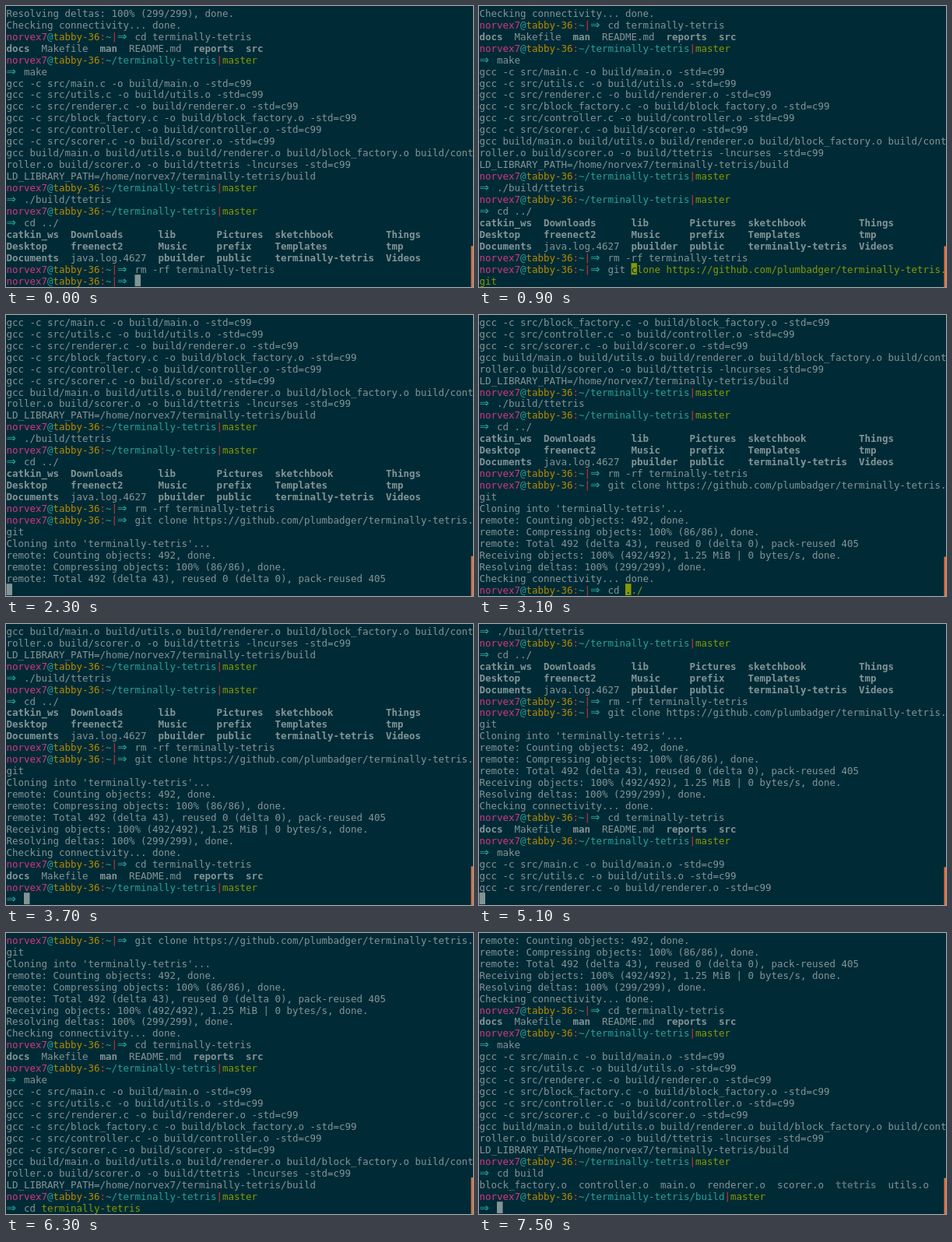
Write an HTML page with a canvas that moves like this. It is 600 px wide and 361 px high and loops after 8000 ms.

```html
<!DOCTYPE html>
<html lang="en">
<head>
<meta charset="utf-8">
<title>Terminal session</title>
<style>
html, body { margin: 0; width: 100%; height: 100%; overflow: hidden; background: #002b36; }
canvas { display: block; }
</style>
</head>
<body>
<canvas id="term" width="600" height="361"></canvas>
<script>
const ctx = document.getElementById('term').getContext('2d');
const LOOP = 8000, COLS = 80, ROWS = 24;
const CELL_W = 7.5, CELL_H = 14.95, LEFT = 0.5, TOP = 1.3, ASCENT = 12.5;
const FONT = '12.5px "DejaVu Sans Mono", "Noto Sans Mono", monospace';
const ARROW_FONT = '15px "DejaVu Sans", sans-serif';
const C = {
  bg: '#002b36', fg: '#839496', dim: '#586e75', magenta: '#d33682', cyan: '#2aa198',
  yellow: '#b58900', red: '#dc322f', green: '#859900', bar: '#e2713f'
};

// A line is a list of cells.
const run = (text, color = C.fg, bold = false) => [...text].map(ch => ({ ch, color, bold }));
// Text between asterisks is bold.
const rich = (text, color) => text.split('*').flatMap((part, i) => run(part, color, i % 2 === 1));

function wrap(cells) {
  const rows = [];
  do rows.push(cells.slice(rows.length * COLS, (rows.length + 1) * COLS));
  while (rows.length * COLS < cells.length);
  return rows;
}

const who = path => [
  ...run('norvex7', C.magenta), ...run('@', C.cyan), ...run('tabby-36', C.yellow),
  ...run(':', C.red), ...run(path, C.cyan), ...run('|', C.red)
];
const arrow = run('⇒  ', C.cyan);
const home = [...who('~'), ...arrow];
const REPO = 'terminally-tetris';
const CLONE = `git clone https://github.com/plumbadger/${REPO}.git`;

const log = [];
const add = cells => log.push(...wrap(cells));
const say = (...lines) => lines.forEach(line => add(rich(line)));
const atHome = cmd => add([...home, ...run(cmd)]);
const branch = (sub = '') => add([...who(`~/${REPO}${sub}`), ...run('master', C.green)]);
const inRepo = cmd => { branch(); add([...arrow, ...run(cmd)]); };

function fetched() {
  say('Resolving deltas: 100% (299/299), done.', 'Checking connectivity... done.');
}

function enterAndMake() {
  atHome(`cd ${REPO}`);
  say('*docs*  Makefile  *man*  README.md  *reports*  *src*');
  inRepo('make');
  const units = ['main', 'utils', 'renderer', 'block_factory', 'controller', 'scorer'];
  units.forEach(u => say(`gcc -c src/${u}.c -o build/${u}.o -std=c99`));
  say(`gcc ${units.map(u => `build/${u}.o`).join(' ')} -o build/ttetris -lncurses -std=c99`,
      `LD_LIBRARY_PATH=/home/norvex7/${REPO}/build`);
}

function listing(...names) {
  const stops = [0, 11, 26, 36, 46, 65];
  say(names.reduce((line, name, i) => {
    const pad = stops[i] - line.replace(/\*/g, '').length;
    return line + ' '.repeat(pad) + (name.startsWith('java') ? name : `*${name}*`);
  }, ''));
}

fetched();
enterAndMake();
inRepo('./build/ttetris');
inRepo('cd ../');
listing('catkin_ws', 'Downloads', 'lib', 'Pictures', 'sketchbook', 'Things');
listing('Desktop', 'freenect2', 'Music', 'prefix', 'Templates', 'tmp');
listing('Documents', 'java.log.4627', 'pbuilder', 'public', REPO, 'Videos');
atHome(`rm -rf ${REPO}`);
atHome(CLONE);
say(`Cloning into '${REPO}'...`,
    'remote: Counting objects: 492, done.',
    'remote: Compressing objects: 100% (86/86), done.',
    'remote: Total 492 (delta 43), reused 0 (delta 0), pack-reused 405',
    'Receiving objects: 100% (492/492), 1.25 MiB | 0 bytes/s, done.');
fetched();
enterAndMake();
inRepo('cd build');
add([...run('block_factory.o  controller.o  main.o  renderer.o  scorer.o  '),
     ...run('ttetris', C.dim, true), ...run('  utils.o')]);
branch('/build');

// Rows of finished output after which a prompt waits for input.
const prompts = { 23: home, 32: home, 35: arrow, 46: arrow, 49: arrow };

// [start ms, finished rows, full command, typed length, cursor hidden]
const steps = [
  [0, 23, '', 0],
  [400, 23, CLONE, 1],
  [900, 23, CLONE, 4],
  [1300, 23, CLONE, CLONE.length],
  [1600, 25, '', 0],
  [1700, 26, '', 0],
  [2100, 27, '', 0],
  [2200, 28, '', 0],
  [2300, 29, '', 0],
  [2400, 30, '', 0],
  [2500, 32, '', 0],
  [2800, 32, 'cd ../', 1],
  [2900, 32, 'cd ../', 2],
  [3100, 32, 'cd ../', 3],
  [3200, 32, `cd ${REPO}`, 4],
  [3500, 32, `cd ${REPO}`, 20],
  [3700, 35, '', 0],
  [4300, 35, '', 0, true],
  [4800, 36, '', 0],
  [4900, 37, '', 0],
  [5000, 38, '', 0],
  [5100, 39, '', 0],
  [5200, 41, '', 0],
  [5300, 46, '', 0],
  [5700, 46, `cd ${REPO}`, 1],
  [5800, 46, `cd ${REPO}`, 2],
  [6300, 46, `cd ${REPO}`, 2, true],
  [6800, 46, `cd ${REPO}`, 3],
  [6900, 46, 'cd build', 4],
  [7000, 46, 'cd build', 5],
  [7100, 46, 'cd build', 8],
  [7500, 49, '', 0]
];

const cellX = col => LEFT + col * CELL_W;
const cellY = row => TOP + row * CELL_H;

function drawCell({ ch, color, bold }, col, row) {
  if (ch === ' ') return;
  ctx.fillStyle = color;
  ctx.font = ch === '⇒' ? ARROW_FONT : (bold ? 'bold ' : '') + FONT;
  ctx.fillText(ch, cellX(col), cellY(row) + ASCENT);
}

function draw([, done, cmd, typed, hidden]) {
  const prompt = prompts[done] || [];
  const input = [...prompt, ...run(cmd.slice(0, typed)), ...run(cmd.slice(typed), C.green)];
  const rows = [...log.slice(0, done), ...wrap(input)];
  const top = rows.length - ROWS;

  ctx.fillStyle = C.bg;
  ctx.fillRect(0, 0, 600, 361);
  rows.slice(top).forEach((cells, r) => cells.forEach((cell, c) => drawCell(cell, c, r)));

  if (!hidden) {
    const at = prompt.length + typed;
    const under = input[at];
    const col = at % COLS, row = done + Math.floor(at / COLS) - top;
    ctx.fillStyle = under ? under.color : C.fg;
    ctx.fillRect(cellX(col), cellY(row), CELL_W, CELL_H);
    if (under) drawCell({ ...under, color: C.bg }, col, row);
  }

  const barTop = 308.3 + top * 0.25;
  ctx.fillStyle = C.bar;
  ctx.fillRect(597.5, barTop, 2.5, 361 - barTop);
}

let shown = null;
const start = performance.now();
function tick() {
  const t = (performance.now() - start) % LOOP;
  const step = steps.filter(s => s[0] <= t).pop();
  if (step !== shown) draw(shown = step);
  requestAnimationFrame(tick);
}
tick();
</script>
</body>
</html>
```
